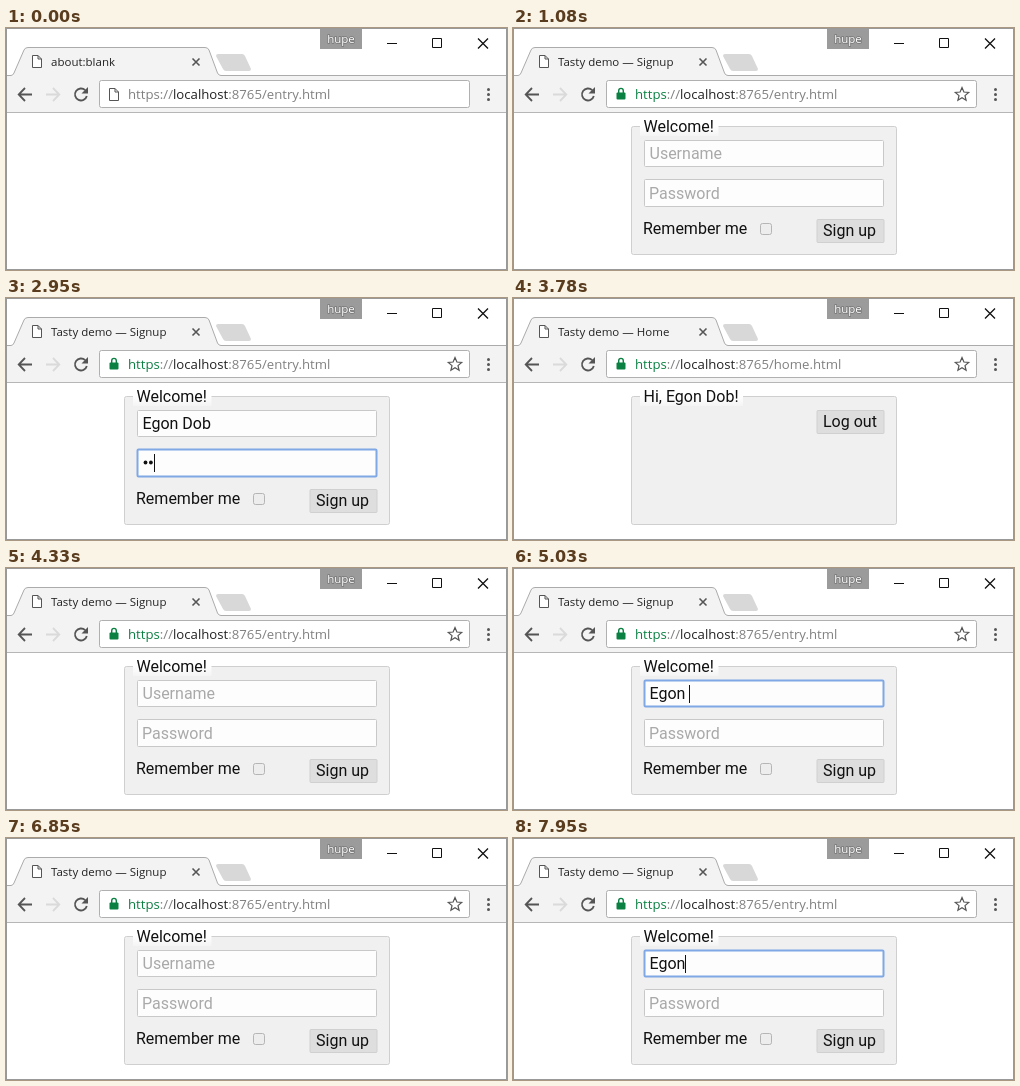
An HTML page for the animation above (8 s loop, 501x242 px).

```html
<!DOCTYPE html>
<html lang="en">
<head>
<meta charset="utf-8">
<title>Signup demo</title>
<style>
  html, body { margin: 0; width: 100%; height: 100%; overflow: hidden; background: #fff; }
  svg { display: block; width: 501px; height: 242px; }
  text { white-space: pre; }
  .ui { font: 11.5px "Open Sans", sans-serif; fill: #222; }
  .badge { fill: #fff; stroke: #777; stroke-width: 1.5px; paint-order: stroke; }
  .url { font: 13.2px "Open Sans", sans-serif; fill: #808080; }
  .page text { font: 16px Roboto, sans-serif; fill: #111; }
  .page .hint { fill: #a9a9a9; }
  .line { fill: none; stroke: #555; }
  .box { fill: #fdfdfd; stroke: #c8c8c8; }
  .button { fill: #dedede; stroke: #d0d0d0; }
  .focus { stroke: #7fa8e4; stroke-width: 2px; }
  .mark { fill: #3091f7; }
  .page .marked { fill: #fff; }
  .spinner { animation: spin 800ms linear infinite; transform-origin: 31px 34px; }
  @keyframes spin { to { transform: rotate(360deg); } }
</style>
</head>
<body>
<svg viewBox="0 0 501 242">
  <defs>
    <linearGradient id="fade">
      <stop offset="0" stop-color="#f3f3f3" stop-opacity="0"/>
      <stop offset="1" stop-color="#f3f3f3"/>
    </linearGradient>
    <linearGradient id="gapShade" x2="0" y2="1">
      <stop offset=".4" stop-color="#fff"/>
      <stop offset="1" stop-color="#f4f4f4"/>
    </linearGradient>
    <clipPath id="titleClip"><path d="M44 22H178V46H44Z"/></clipPath>
    <path id="sheet" d="M.5 .5H6L9.5 4V12.5H.5ZM6 .5V4H9.5" fill="#fff" stroke="#555"/>
  </defs>
  <rect width="501" height="242" fill="#fff"/>

  <!-- window frame -->
  <rect x="314" y="1" width="42" height="20" fill="#9b9b9b"/>
  <text class="ui badge" x="335" y="15" text-anchor="middle">hupe</text>
  <path class="line" d="M381 15.5H391M426.5 10.5H435.5V19.5H426.5Z" style="stroke:#111"/>
  <path class="line" d="M472 10.5L482 20.5M482 10.5L472 20.5" stroke-width="1.3" style="stroke:#111"/>
  <path d="M212 26H236Q238 26 239 28L245 41Q245 43 243 43H220Q218 43 217 41L210 28Q210 26 212 26Z" fill="#d8d8d8"/>
  <rect x="1" y="48" width="499" height="36" fill="#f3f3f3"/>
  <path d="M1 47.5H5Q7 47.5 8 45L18 22Q19 19.5 22 19.5H199Q202 19.5 203 22L211.5 45Q212.5 47.5 215 47.5H500" fill="#f3f3f3" stroke="#ababab"/>
  <path d="M8 48H212" stroke="#f3f3f3" stroke-width="2"/>
  <path d="M1 84.5H500" stroke="#b6b6b6"/>

  <!-- tab -->
  <use id="tabIcon" href="#sheet" x="26" y="27"/>
  <path id="spinner" class="spinner" d="M31 28A6 6 0 1 1 25 34" fill="none" stroke="#dadada" stroke-width="1.2" stroke-dasharray="2 3"/>
  <g clip-path="url(#titleClip)"><text id="title" class="ui" x="45" y="38"></text></g>
  <rect x="160" y="24" width="18" height="20" fill="url(#fade)"/>
  <path class="line" d="M186.5 30.5L193.5 37.5M193.5 30.5L186.5 37.5" stroke-width="1.6"/>

  <!-- toolbar -->
  <path class="line" d="M26 66.5H13M19 60L12.7 66.5L19 73" stroke-width="1.8"/>
  <path class="line" d="M40 66.5H53M47 60L53.3 66.5L47 73" stroke-width="1.8" style="stroke:#dadada"/>
  <g id="reload">
    <path class="line" d="M79.2 62.2A6 6 0 1 0 80.8 68" stroke-width="1.8"/>
    <path d="M82 59V65.5H75.5Z" fill="#555"/>
  </g>
  <path id="stop" class="line" d="M69.5 61L80.5 72M80.5 61L69.5 72" stroke-width="1.6"/>
  <rect x="93.5" y="52.5" width="370" height="27" rx="2" fill="#fff" stroke="#b0b0b0"/>
  <use id="urlIcon" href="#sheet" x="103" y="60"/>
  <g id="secure">
    <rect x="103.5" y="64.5" width="9" height="7" rx="1" fill="#0b8043"/>
    <path d="M105.7 65V62.7A2.3 2.3 0 0 1 110.3 62.7V65" fill="none" stroke="#0b8043" stroke-width="1.4"/>
    <path class="line" d="M449 59.5L450.9 64L455.7 64.4L452 67.6L453.1 72.3L449 69.8L444.9 72.3L446 67.6L442.3 64.4L447.1 64Z" stroke-width="1.2"/>
  </g>
  <text class="url" x="122" y="71"><tspan id="scheme">https</tspan>://<tspan fill="#222">localhost</tspan>:8765/<tspan id="path"></tspan></text>
  <g fill="#555"><circle cx="482.5" cy="61.5" r="1.5"/><circle cx="482.5" cy="66.5" r="1.5"/><circle cx="482.5" cy="71.5" r="1.5"/></g>

  <!-- page -->
  <g id="page" class="page">
    <rect x="118.5" y="98.5" width="265" height="128" rx="2" fill="#f0f0f0" stroke="#cfcfcf"/>
    <rect id="legendGap" x="127" y="91" height="17" fill="url(#gapShade)"/>
    <rect id="legendMark" class="mark" x="130" y="90" height="18"/>
    <text id="legend" x="130.5" y="104"></text>
    <g id="form">
      <rect id="nameBox" class="box" x="131.5" y="112.5" width="239" height="26" rx="1"/>
      <text id="name" x="136.5" y="131"></text>
      <rect id="passBox" class="box" x="131.5" y="151.5" width="239" height="27" rx="1"/>
      <text id="passHint" class="hint" x="136" y="171">Password</text>
      <g id="dots"></g>
      <rect id="caret" width="1" height="18" fill="#111"/>
      <text x="130" y="206">Remember me</text>
      <rect x="247.5" y="195.5" width="11" height="11" rx="2" fill="#ededed" stroke="#b5b5b5"/>
    </g>
    <rect id="button" class="button" x="304" width="67" height="23" rx="1"/>
    <rect id="buttonMark" class="mark" x="310" height="19"/>
    <text id="label" x="310"></text>
  </g>

  <rect x=".5" y=".5" width="500" height="241" fill="none" stroke="#999"/>
</svg>
<script>
const LOOP = 8000, KEY = 75, USER = "Egon Dob", SECRET = 7;
const el = Object.fromEntries([...document.querySelectorAll("[id]")].map(e => [e.id, e]));
const show = (e, on) => e.style.display = on ? "" : "none";
const set = (e, attrs) => Object.entries(attrs).forEach(([k, v]) => e.setAttribute(k, v));
const put = (e, s) => { if (e.textContent !== s) e.textContent = s; };
const clamp = (v, hi) => Math.max(0, Math.min(hi, Math.floor(v)));

for (let i = 0; i < SECRET; i++) {
  const dot = document.createElementNS("http://www.w3.org/2000/svg", "circle");
  set(dot, { cx: 139.5 + i * 5.4, cy: 164.5, r: 1.9, fill: "#111" });
  el.dots.append(dot);
}

// Each round is anchored at its first keystroke.
const rounds = [2085, 4620, 7610];
const round = s => [
  [s - 220, { mark: "legend" }],
  [s - 80, { mark: "", focus: "name", typing: s }],
  [s + 650, { focus: "pass" }],
  [s + 1330, { focus: "button", mark: "button" }],
  [s + 1430, { loading: true, path: "home" }],
  [s + 1630, { loading: false, page: "home", focus: "", mark: "" }],
  [s + 1780, { mark: "legend" }],
  [s + 1900, { mark: "" }],
  [s + 2000, { mark: "button", focus: "button" }],
  [s + 2060, { loading: true, path: "entry" }],
  [s + 2200, { loading: false, page: "entry", focus: "", mark: "", typing: LOOP }],
];
const timeline = [
  [0, { path: "entry", page: "", focus: "", mark: "", loading: false, secure: false, typing: LOOP }],
  [450, { loading: true, secure: true }],
  [950, { loading: false, page: "entry" }],
  ...rounds.flatMap(round),
];

function drawBrowser(s) {
  const pageTitle = { "": "about:blank", entry: "Tasty demo — Signup", home: "Tasty demo — Home" }[s.page];
  put(el.title, s.loading ? `https://localhost:8765/${s.path}.html` : pageTitle);
  put(el.path, s.path + ".html");
  set(el.scheme, { fill: s.secure ? "#0b8043" : "#808080" });
  show(el.secure, s.secure);
  show(el.urlIcon, !s.secure);
  show(el.tabIcon, !s.loading);
  show(el.spinner, s.loading);
  show(el.reload, !s.loading);
  show(el.stop, s.loading);
}

function drawForm(s, t) {
  const letters = USER.slice(0, clamp((t - s.typing) / KEY, USER.length));
  const count = clamp((t - s.typing - 690) / KEY, SECRET);
  put(el.name, letters || "Username");
  el.name.classList.toggle("hint", !letters);
  show(el.passHint, !count);
  [...el.dots.children].forEach((dot, i) => show(dot, i < count));
  el.nameBox.classList.toggle("focus", s.focus === "name");
  el.passBox.classList.toggle("focus", s.focus === "pass");
  show(el.caret, s.focus === "name" || s.focus === "pass");
  if (s.focus === "name") {
    const width = letters ? el.name.getComputedTextLength() : 0;
    set(el.caret, { x: Math.round(136 + width), y: 117 });
  } else {
    set(el.caret, { x: Math.round(137 + count * 5.4), y: 156 });
  }
}

function drawPage(s, t) {
  show(el.page, s.page);
  if (!s.page) return;
  const home = s.page === "home";
  put(el.legend, home ? `Hi, ${USER}!` : "Welcome!");
  const width = el.legend.getComputedTextLength();
  set(el.legendGap, { width: width + 8 });
  set(el.legendMark, { width });

  const top = home ? 112.5 : 191.5;
  put(el.label, home ? "Log out" : "Sign up");
  set(el.button, { y: top });
  set(el.label, { y: top + 16.5 });
  set(el.buttonMark, { y: top + 2.5, width: el.label.getComputedTextLength() });
  el.button.classList.toggle("focus", s.focus === "button");

  for (const [name, text] of [["legend", el.legend], ["button", el.label]]) {
    show(el[name + "Mark"], s.mark === name);
    text.classList.toggle("marked", s.mark === name);
  }
  show(el.form, !home);
  if (!home) drawForm(s, t);
}

function frame() {
  const t = performance.now() % LOOP;
  const state = {};
  for (const [at, change] of timeline) if (at <= t) Object.assign(state, change);
  drawBrowser(state);
  drawPage(state, t);
  requestAnimationFrame(frame);
}
frame();
</script>
</body>
</html>
```
